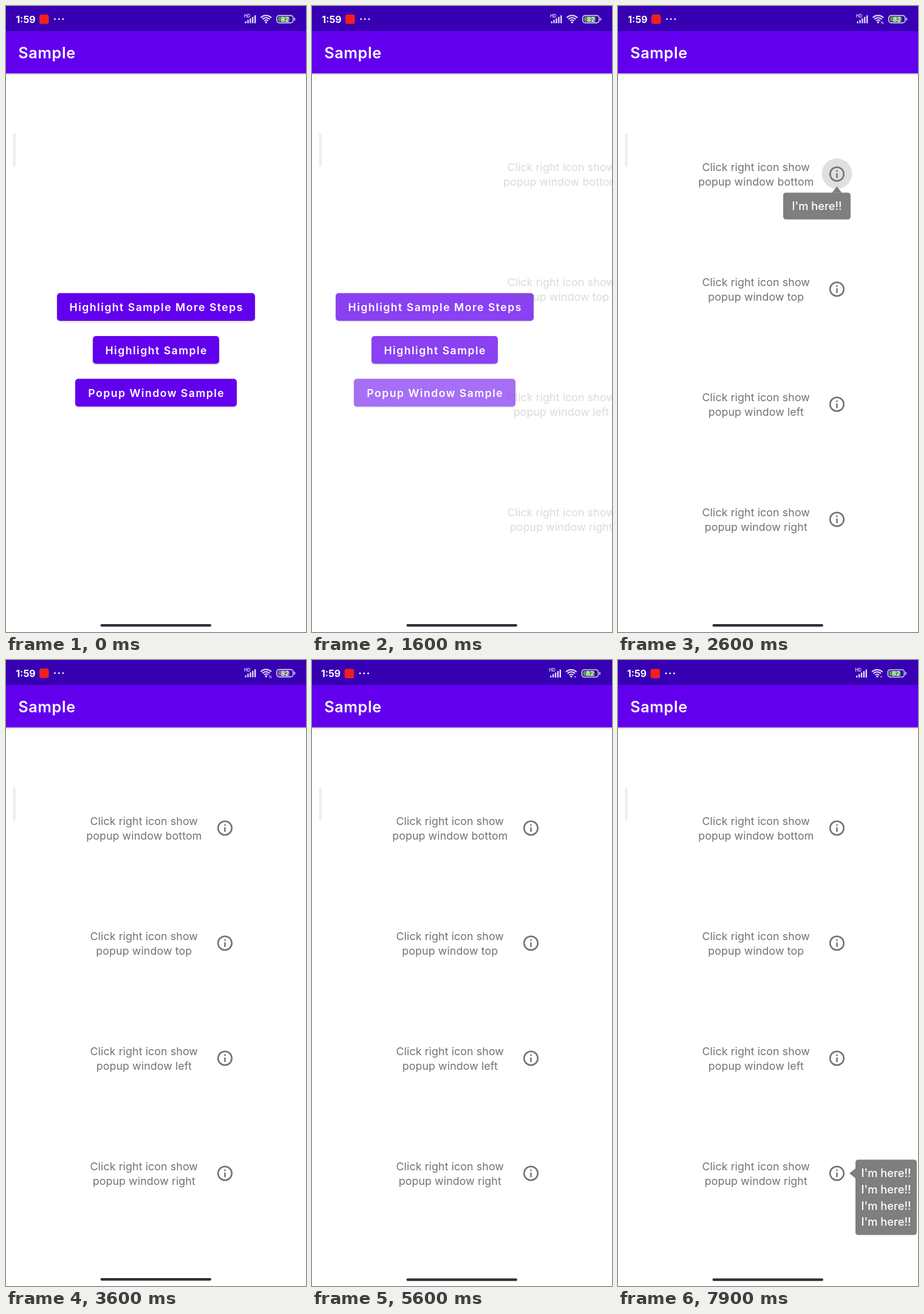
These frames come from a looping animation (494x1028 px, 8 s). An HTML page with a canvas:

```html
<!DOCTYPE html>
<html lang="en">
<head>
<meta charset="utf-8">
<title>Popup sample</title>
<style>
html, body { margin: 0; width: 100%; height: 100%; overflow: hidden; background: #fff; }
canvas { display: block; width: 494px; height: 1028px; }
</style>
</head>
<body>
<canvas id="stage" width="494" height="1028"></canvas>
<script>
const W = 494, H = 1028, LOOP = 8000, STEP = 100;
const FONT = 'Inter, "Open Sans", sans-serif';
const PURPLE = '#6200ee', GREY = '#737373', PALE = '#e9e4f7';
const ROW_Y = 276, ROW_STEP = 189, ICON_X = 360.5;
const LINE = 26.6, BUTTON_H = 45.5;

const screen = document.getElementById('stage').getContext('2d');
const layer = document.createElement('canvas');
layer.width = W;
layer.height = H;
const layerCtx = layer.getContext('2d');
let c = screen;

const buttons = [
  { label: 'Highlight Sample More Steps', x: 84, y: 471.5, w: 326 },
  { label: 'Highlight Sample', x: 143, y: 542, w: 208 },
  { label: 'Popup Window Sample', x: 114, y: 612.3, w: 266 }
];
const sides = ['bottom', 'top', 'left', 'right'];

// press: icon touched, show/hide: popup starts to fade
const popups = [
  { side: 'bottom', x: 272, y: 306.5, w: 111, lines: 1, press: 2380, show: 2450, hide: 3380 },
  { side: 'top', x: 272, y: 390.5, w: 111, lines: 1, press: 4280, show: 4380, hide: 5090 },
  { side: 'left', x: 219, y: 631.5, w: 111, lines: 4, press: 6080, show: 6200, hide: 7480 },
  { side: 'right', x: 391, y: 820.5, w: 101, lines: 4, press: 7460, show: 7600, hide: 9000 }
];

const ramp = (t, from, len) => Math.min(1, Math.max(0, (t - from) / len));
const ease = p => (1 - Math.cos(Math.PI * p)) / 2;

function text(str, x, y, size, weight, color, align = 'left', spacing = 0) {
  c.font = `${weight} ${size}px ${FONT}`;
  c.letterSpacing = spacing + 'px';
  c.textAlign = align;
  c.fillStyle = color;
  c.fillText(str, x + (align === 'center' ? spacing / 2 : 0), y);
}

function box(x, y, w, h, r, color) {
  c.beginPath();
  c.roundRect(x, y, w, h, r);
  c.fillStyle = color;
  c.fill();
}

function disc(x, y, r, color) {
  c.beginPath();
  c.arc(x, y, r, 0, Math.PI * 2);
  c.fillStyle = color;
  c.fill();
}

function shadow(blur, dy, alpha) {
  c.shadowColor = `rgba(0,0,0,${alpha})`;
  c.shadowBlur = blur;
  c.shadowOffsetY = dy;
}

function drawHome(t) {
  buttons.forEach((b, i) => {
    c.save();
    shadow(3, 1, 0.24);
    box(b.x, b.y, b.w, BUTTON_H, 5, PURPLE);
    c.restore();
    if (i === 2 && t > 1300) {
      c.save();
      c.beginPath();
      c.roundRect(b.x, b.y, b.w, BUTTON_H, 5);
      c.clip();
      disc(247, b.y + BUTTON_H / 2, 140 * ramp(t, 1300, 250), 'rgba(255,255,255,.24)');
      c.restore();
    }
    text(b.label, b.x + b.w / 2, b.y + 29.5, 17.6, 600, '#fff', 'center', 1.5);
  });
}

function infoIcon(x, y) {
  const u = 1.257;
  c.beginPath();
  c.arc(x, y, 9 * u, 0, Math.PI * 2);
  c.lineWidth = 2 * u;
  c.strokeStyle = GREY;
  c.stroke();
  c.fillStyle = GREY;
  c.fillRect(x - u, y - 5 * u, 2 * u, 2 * u);
  c.fillRect(x - u, y - u, 2 * u, 6 * u);
}

function drawRipple(t, start, y) {
  const age = t - start;
  if (age < 0 || age > 420) return;
  const alpha = 0.12 * (1 - ramp(age, 270, 150));
  disc(ICON_X, y - 0.7, 8 + 17 * ramp(age, 0, 180), `rgba(0,0,0,${alpha})`);
}

function drawList(t) {
  sides.forEach((side, i) => {
    const y = ROW_Y + i * ROW_STEP;
    text('Click right icon show', 227.2, y - 4.6, 17.8, 400, GREY, 'center', 0.1);
    text('popup window ' + side, 227.2, y + 19.2, 17.8, 400, GREY, 'center', 0.1);
    drawRipple(t, popups[i].press, y);
    infoIcon(ICON_X, y);
  });
}

function drawPopup(p, i, t) {
  const alpha = ramp(t, p.show, 150) * (1 - ramp(t, p.hide, 200));
  if (!alpha) return;
  const h = 44 + (p.lines - 1) * LINE;
  const rowY = ROW_Y + i * ROW_STEP;
  const [x, y, angle] = {
    bottom: [ICON_X, p.y, -Math.PI / 2],
    top: [ICON_X, p.y + h, Math.PI / 2],
    left: [p.x + p.w, rowY, 0],
    right: [p.x, rowY, Math.PI]
  }[p.side];
  c.save();
  c.globalAlpha = alpha;
  box(p.x, p.y, p.w, h, 4.5, 'rgba(0,0,0,.5)');
  for (let n = 0; n < p.lines; n++) {
    text("I'm here!!", p.x + p.w / 2, p.y + 28.8 + n * LINE, 18.3, 500, '#fff', 'center');
  }
  c.translate(x, y);
  c.rotate(angle);
  c.beginPath();
  c.moveTo(0, -8);
  c.lineTo(10, 0);
  c.lineTo(0, 8);
  c.fillStyle = 'rgba(0,0,0,.5)';
  c.fill();
  c.restore();
}

function drawPage(draw, t, dx, alpha) {
  if (alpha <= 0) return;
  if (alpha >= 1) return draw(t);
  layerCtx.clearRect(0, 0, W, H);
  c = layerCtx;
  draw(t);
  c = screen;
  c.globalAlpha = alpha;
  c.drawImage(layer, Math.round(dx), 0);
  c.globalAlpha = 1;
}

function drawWifi(x, y, activity) {
  c.strokeStyle = PALE;
  c.lineWidth = 2;
  for (const r of [4.5, 8.3, 12]) {
    c.beginPath();
    c.arc(x, y, r, -Math.PI * 0.76, -Math.PI * 0.24);
    c.stroke();
  }
  disc(x, y - 0.8, 1.7, PALE);
  if (activity === 1) {
    c.fillStyle = '#c9bcec';
    c.fillRect(x + 5, y - 2.5, 1.2, 4);
    c.fillRect(x + 7.4, y - 1.5, 1.2, 4);
  } else if (activity === 2) {
    disc(x + 6.5, y - 0.3, 1.2, '#c9bcec');
  }
}

function drawStatus(t, shifted) {
  c.save();
  if (shifted) c.translate(-1.4, 0.4);
  text('1:59', 16.3, 27.5, 15.8, 700, '#fff');
  box(55, 14, 15.5, 15.5, 3.5, '#f0201f');
  for (let i = 0; i < 3; i++) disc(80.5 + i * 6.7, 21.6, 1.4, '#fff');

  text('HD', 392, 19, 7, 600, PALE);
  c.fillStyle = PALE;
  for (let i = 0; i < 5; i++) {
    const h = 3 + i * 2.5;
    c.fillRect(393.5 + i * 3.9, 28.3 - h, 2.3, h);
  }
  drawWifi(428.3, 27.5, shifted ? 2 : t >= 2100 ? 1 : 0);

  c.beginPath();
  c.roundRect(445.8, 15.6, 27, 12, 4);
  c.lineWidth = 1.6;
  c.strokeStyle = '#d9d2ea';
  c.stroke();
  const dull = t >= 3400 && !shifted;
  box(448, 17.6, 19, 8, 2, dull ? '#72707d' : '#4c9f3c');
  box(474.4, 19.2, 1.8, 4.8, 1, '#d9d2ea');
  text('82', 459.3, 25.6, 10.5, 600, '#fff', 'center');
  c.restore();
}

function drawChrome(t) {
  const shifted = t >= 4300;
  c.save();
  shadow(4, 1, 0.2);
  c.fillStyle = PURPLE;
  c.fillRect(-10, 41, W + 20, 69.7);
  c.restore();
  c.fillStyle = '#3700b3';
  c.fillRect(0, 0, W, 41);
  text('Sample', 20.3, 85.5, 25.2, 600, '#fff', 'left', 0.6);
  drawStatus(t, shifted);
  box(11.5, 209, 4.5, 55, 2, '#eeeeee');
  box(155.5, shifted ? 1015.6 : 1015, 182.5, 4.2, 2.1, '#313135');
}

function render(t) {
  c.fillStyle = '#fff';
  c.fillRect(0, 0, W, H);
  const p = ease(ramp(t, 1498, 300));
  drawPage(drawHome, t, -W * 0.35 * p, 1 - p);
  drawPage(drawList, t, W * 0.5 * (1 - p), p);
  drawChrome(t);
  popups.forEach((popup, i) => drawPopup(popup, i, t));
}

// The picture is held for STEP ms at a time, with a little slack for timer jitter.
const start = performance.now();
function tick() {
  const elapsed = performance.now() - start + 8;
  render(Math.floor(elapsed / STEP) * STEP % LOOP);
  requestAnimationFrame(tick);
}
tick();
</script>
</body>
</html>
```
